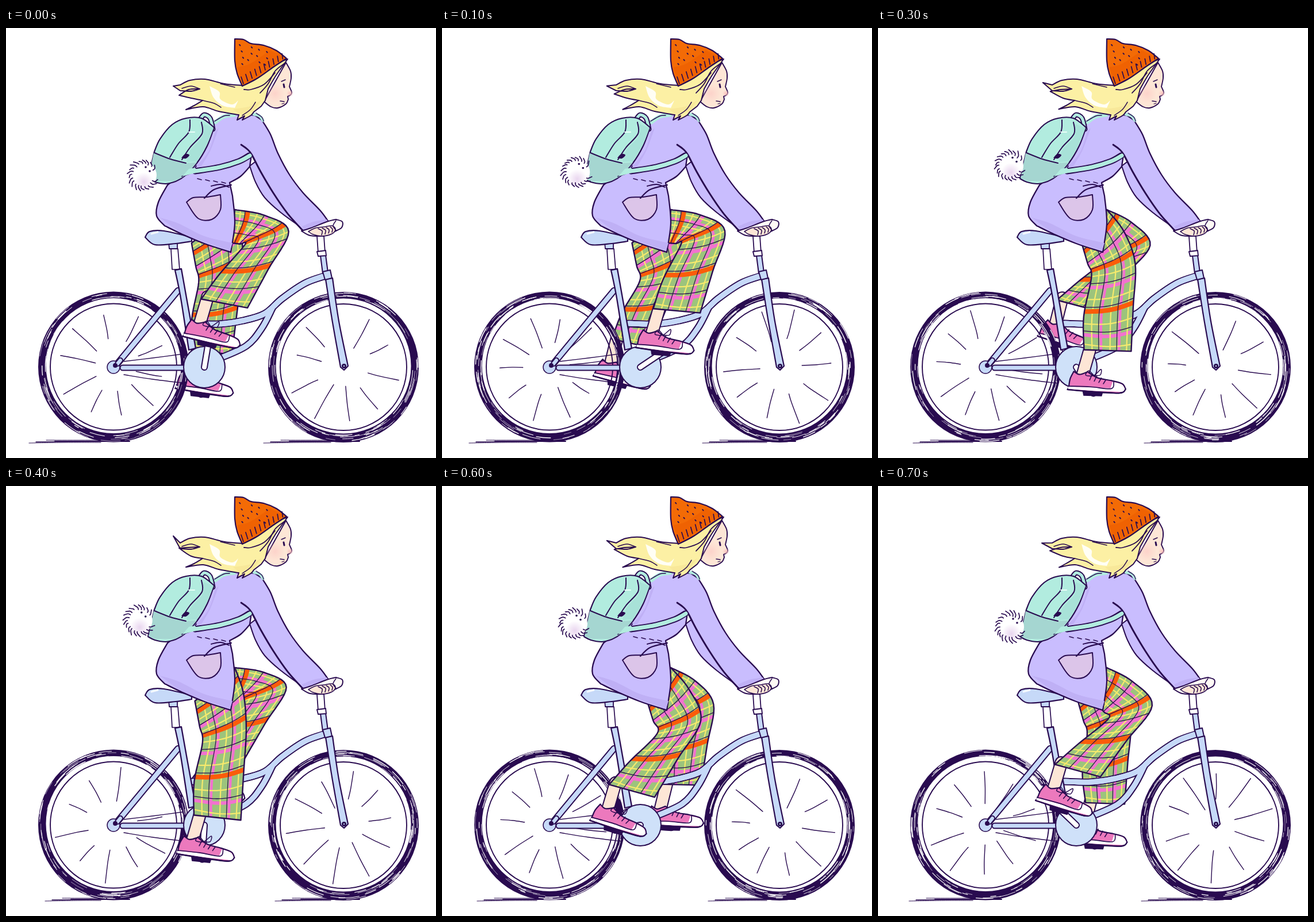
Write an HTML page with a canvas that moves like this. It is 748 px wide and 748 px high and loops after 0.8 s.

```html
<!DOCTYPE html>
<html lang="en">
<head>
<meta charset="utf-8">
<title>Cyclist</title>
<style>
html, body { margin: 0; width: 100%; height: 100%; overflow: hidden; background: #fff; }
canvas { display: block; }
</style>
</head>
<body>
<canvas id="stage" width="748" height="748"></canvas>
<script>
const ctx = document.getElementById('stage').getContext('2d');
const INK = '#290b50', BLUE = '#c6d9f8', LILAC = '#c9bdfe', SHADE = '#bfb0f5', MINT = '#b2ecdf', TEAL = '#a5d6d1';
const GREEN = '#9cc47c', PINK = '#f272cf', ORANGE = '#fb5c0a', YELLOW = '#f6ea6c';
const SKIN = '#fde6d6', HAIR = '#fcf0a4', SHOE = '#ec79bd';
const TAU = Math.PI * 2, RAD = TAU / 360, { sin, cos } = Math;
const HIP = [350, 330], CRANK = [345, 590];

// Heel orbit and bone lengths; the far pedal trails by half a turn.
const NEAR = { lead: -83, cx: 302, cy: 587, rx: 45, ry: 52, thigh: 110, shin: 190, hem: 82 };
const FAR = { lead: 102, cx: 305, cy: 577, rx: 50, ry: 50, thigh: 105, shin: 180, hem: 68 };

function random(seed) {
  return () => {
    seed = (seed * 16807) % 2147483647;
    return seed / 2147483647;
  };
}

const shift = ([x, y], dx, dy) => [x + dx, y + dy];
const mix = (a, b, t) => [a[0] + (b[0] - a[0]) * t, a[1] + (b[1] - a[1]) * t];
const polar = (x, y, r, a) => [x + r * cos(a), y + r * sin(a)];

// Smooth path through points; "|" makes a corner.
function trace(text) {
  const path = new Path2D();
  text.split('|').forEach((part, n) => {
    const p = part.trim().split(/\s+/).map(s => s.split(',').map(Number));
    p.forEach((q, i) => {
      if (!i) return n ? path.lineTo(...q) : path.moveTo(...q);
      const o = p[i - 1], a = p[i - 2] || o, b = p[i + 1] || q;
      path.bezierCurveTo(o[0] + (q[0] - a[0]) / 6, o[1] + (q[1] - a[1]) / 6,
        q[0] - (b[0] - o[0]) / 6, q[1] - (b[1] - o[1]) / 6, ...q);
    });
  });
  return path;
}

function line(text, width = 2.2, color = INK) {
  ctx.lineWidth = width;
  ctx.strokeStyle = color;
  ctx.stroke(trace(text));
}

function fill(text, color) {
  ctx.fillStyle = color;
  ctx.fill(trace(text));
}

function shape(text, color, width) {
  fill(text, color);
  line(text, width);
}

function tube(text, width, color = BLUE) {
  line(text, width + 2);
  line(text, width - 2, color);
}

function disc(x, y, r, color, width) {
  ctx.beginPath();
  ctx.arc(x, y, r, 0, TAU);
  if (color) { ctx.fillStyle = color; ctx.fill(); }
  if (width) { ctx.lineWidth = width; ctx.strokeStyle = INK; ctx.stroke(); }
}

function glow(x, y, r, color) {
  const g = ctx.createRadialGradient(x, y, 0, x, y, r);
  g.addColorStop(0, color);
  g.addColorStop(1, color.slice(0, 7) + '00');
  disc(x, y, r, g);
}

function wheel(cx, cy, spin, seed) {
  const rnd = random(seed);
  for (let i = 0; i < 10; i++) {
    const a = (i * 36 - 90 + spin + rnd() * 6 - 3) * RAD;
    const r1 = 32 + rnd() * 20, r2 = 82 + rnd() * 22;
    line(`${polar(cx, cy, r1, a)} ${polar(cx, cy, 65, a + 0.012)} ${polar(cx, cy, r2, a)}`, 1.4);
  }
  disc(cx, cy, 110, null, 1.9);
  ctx.fillStyle = INK;
  ctx.beginPath();
  ctx.arc(cx, cy, 131, 0, TAU);
  ctx.arc(cx, cy - 2, 117.5, 0, TAU, true);
  ctx.fill();
  ctx.strokeStyle = '#fff';
  for (let i = 0; i < 95; i++) {
    const a = rnd() * TAU;
    ctx.lineWidth = 0.5 + rnd() * 0.9;
    ctx.beginPath();
    ctx.arc(cx, cy, 118 + rnd() * 12, a, a + 0.06 + rnd() * 0.22);
    ctx.stroke();
  }
}

function ground(x, end) {
  line(`${x},722 ${x + 60},721 ${end - 40},721`, 1);
  line(`${x + 12},720 ${end},719`, 1.4);
  line(`${x + 30},717 ${end},717`, 1);
  line(`${x + 45},719 ${end + 10},719`, 2);
}

// Pedal angle to heel, ankle and knee, then the trouser edges around them.
function pose(leg, turn) {
  const a = (leg.lead + turn) * RAD;
  const heel = [leg.cx + leg.rx * cos(a), leg.cy + leg.ry * sin(a)];
  const tilt = (8.5 - 7.5 * cos(a - 25 * RAD)) * RAD;
  const ankle = shift(heel, 25 * cos(tilt) + 24 * sin(tilt), 25 * sin(tilt) - 24 * cos(tilt));

  const dx = ankle[0] - HIP[0], dy = ankle[1] - HIP[1], d = Math.hypot(dx, dy);
  const reach = Math.min(leg.thigh, (leg.thigh ** 2 - leg.shin ** 2 + d * d) / (2 * d));
  const out = Math.sqrt(leg.thigh ** 2 - reach ** 2);
  const knee = shift(HIP, (dx * reach + dy * out) / d, (dy * reach - dx * out) / d);

  const hemBack = shift(ankle, 3, -45), hemFront = polar(...hemBack, leg.hem, tilt);
  const hipFront = [398, 316], hipBack = [333 + 0.87 * (knee[0] - 385), 374];
  const cap = shift(knee, 38, -13), fold = shift(knee, -38, 10);
  return {
    heel, tilt, ankle,
    front: [hipFront, shift(mix(hipFront, cap, 0.5), 5, -9), cap, mix(cap, hemFront, 0.5), hemFront],
    back: [hipBack, mix(hipBack, fold, 0.6), fold, shift(mix(fold, hemBack, 0.5), -7, 5), hemBack]
  };
}

function along(edge, v) {
  const i = Math.min(3, Math.floor(v * 4)), t = v * 4 - i;
  const get = (k, c) => edge[Math.max(0, Math.min(4, k))][c];
  return [0, 1].map(c => {
    const [a, b, d, e] = [-1, 0, 1, 2].map(k => get(i + k, c));
    return b + t * (d - a) / 2 + t * t * (a - 2.5 * b + 2 * d - e / 2) + t * t * t * (1.5 * (b - d) + (e - a) / 2);
  });
}

function trousers({ front, back }) {
  const at = (u, v) => mix(along(back, v), along(front, v), u);
  const run = (path, fn) => { for (let i = 0; i <= 32; i++) path.lineTo(...fn(i / 32)); };
  const stripe = (fn, width, color) => {
    const path = new Path2D();
    run(path, fn);
    ctx.lineWidth = width;
    ctx.strokeStyle = color;
    ctx.stroke(path);
  };
  const down = (us, w, c) => us.forEach(u => stripe(t => at(u, t), w, c));
  const across = (vs, w, c) => vs.forEach(v => stripe(t => at(t, v + 0.02 * sin(t * 3)), w, c));

  const outline = new Path2D();
  run(outline, t => at(0, t));
  run(outline, t => at(1, 1 - t));
  outline.closePath();
  ctx.fillStyle = GREEN;
  ctx.fill(outline);
  ctx.save();
  ctx.clip(outline);
  down([0.36, 0.74], 4.5, PINK);
  across([0.27, 0.58, 0.87], 6, PINK);
  down([0.17, 0.55, 0.9], 2.2, YELLOW);
  across([0.06, 0.19, 0.35, 0.5, 0.65, 0.8, 0.94], 2.2, YELLOW);
  across([0.12, 0.42, 0.72], 8, ORANGE);
  down([0.31, 0.69], 1.2, INK);
  across([0.1, 0.245, 0.395, 0.555, 0.695, 0.845], 1.3, INK);
  ctx.restore();
  ctx.lineWidth = 2.4;
  ctx.strokeStyle = INK;
  ctx.stroke(outline);
}

function foot({ heel, tilt, ankle, front, back }, lace) {
  tube(`${shift(mix(back[4], front[4], 0.14), 0, -6)} ${ankle}`, 21, SKIN);
  ctx.save();
  ctx.translate(...heel);
  ctx.rotate(tilt);
  fill('26,3|62,3|60,11|28,11', INK);
  shape('2,-3 4,-18 10,-31|10,-31 20,-26 34,-31|34,-31 52,-21 76,-17 95,-12 101,-3|101,-3 92,4 70,4 0,1|2,-3', SHOE, 2.2);
  fill('78,-15 94,-11 100,-3|92,2|74,-2|78,-15', '#fff');
  fill('1,-4 50,-4 100,-3|98,2|50,2|1,0', '#fff');
  line('1,-5 40,-5 76,-3 80,-15', 1.7);
  line('0,1 50,4 92,4 101,-3', 2.3);
  for (let i = 0; i < 4; i++) line(`${42 + i * 8},${-27 + i * 3} ${38 + i * 8},${-17 + i * 2}`, 1.6);
  if (lace) line('45,-25 36,-33 31,-25 45,-25 57,-36 56,-26 45,-25', 1.5);
  ctx.restore();
}

function crank({ heel, tilt }) {
  tube(`${CRANK} ${shift(polar(...heel, 45, tilt), 0, 6)}`, 10, '#fff');
}

function bike() {
  line('205,580 255,574 308,567', 1.3);
  line('205,603 255,611 312,618', 1.3);
  tube('203,591 312,591', 9);
  tube('324,514 370,515 412,509 450,497 480,471 520,444 556,431', 11);
  tube('463,488 445,522 418,553 368,576', 11);
  line('326,514 370,515 412,509 450,497 480,471 520,444 554,431', 9, BLUE);
  tube('299,457 245,522 192,586', 10);
  shape('287,384|299,384|302,420|289,420|287,384', '#fff', 1.7);
  shape('283,373|298,373|298,384|284,384|283,373', BLUE, 1.8);
  shape('294,421|305,419 315,475 330,557|318,560 304,470 294,421', BLUE, 2.3);
  shape('242,364 250,354 275,353 323,364|323,371 295,375 259,377 242,364', BLUE, 2.2);
  line('253,358 264,355', 3, '#f4f9ff');
  disc(187, 590, 11, BLUE, 1.5);
  tube('194,584 199,578', 8);
  disc(190, 587, 4, INK);

  shape('541,362|553,362|555,391|543,391|541,362', '#fff', 1.8);
  shape('547,396|556,395|560,425|551,427|547,396', BLUE, 2);
  shape('541,389|556,387|557,396|543,397|541,389', '#fff', 1.9);
  shape('556,437|568,435 579,510 595,588|588,595 582,590|582,590 568,512 556,437', BLUE, 2.2);
  shape('551,424|564,421|567,435|555,438|551,424', BLUE, 2);
  disc(588, 588, 4, INK);
  disc(588, 588, 1.2, BLUE);
}

function coat() {
  shape('424,240 434,268 450,295 478,321 518,350|540,330 490,270 450,220|424,240', LILAC, 2);
  shape('366,160 397,149 433,152|445,160 460,185 473,218 493,255 517,287 547,318 563,340|563,340 545,349 516,352|516,352 490,323 465,287 443,250 427,220|424,241 408,258 389,269|394,292 398,340 391,390|391,390 345,375 307,359 276,344|276,344 262,327 265,303 281,273|330,235|366,160', LILAC, 2.3);
  fill('268,330 300,340 345,362 394,374|390,387 345,372 305,356 268,330', SHADE);
  fill('364,180 352,215 330,242|340,240 356,212 370,174|364,180', SHADE);
  fill('515,345 535,337 558,333|562,340 540,348 518,350|515,345', SHADE);
  line('409,203 420,211 428,221 443,250 465,287 490,323 516,352', 2.8);
  shape('314,303 326,295 350,294 373,290|373,290 373,316 358,333 334,331 314,303', '#dcc5e9', 2);
  line('345,296 362,281 392,273', 2.2);
  line('357,275 373,272 388,277', 1.8);
  for (let i = 0; i < 4; i++) line(`${333 + i * 14},${262 + i * 2} ${340 + i * 14},${264 + i * 2}`, 1.7);
}

function backpack() {
  line('329,249 372,242 405,232 423,222', 11, INK);
  line('328,249 372,242 405,232 424,222', 7, MINT);
  line('364,164 379,154 397,151', 7, MINT);
  line('363,162 379,153 389,152', 1.5);
  tube('339,157 345,151 355,157 360,176', 7, MINT);
  shape('258,215 268,193 289,168 313,157 340,157 362,173|362,173 350,205 332,235 310,258 295,267|295,267 278,271 259,268 247,262|258,215', MINT, 2.2);
  fill('257,217 284,228 313,235|332,234 312,256 293,266|260,266|248,261|257,217', TEAL);
  fill('341,166 342,188 321,212 314,233|332,232 350,202 361,174|341,166', '#a8e2d8');
  line('320,160 318,181 300,201 285,225', 2);
  line('340,164 341,184 320,208 306,229', 2);
  line('258,217 286,228 313,235', 2);
  line('318,181 328,181', 2, '#eafff9');
  fill('305,226 312,219 319,221 313,227 305,226', INK);
  line('331,240 322,252 306,258', 1.7);
  fill('318,245 329,243|333,251|307,258|318,245', MINT);
}

function tassel(x, y, seed) {
  const rnd = random(seed);
  disc(x, y, 23, '#fff');
  glow(x + 1, y + 12, 17, '#e9d6ef');
  for (let i = 0; i < 19; i++) {
    const a = (30 + i * 16.5 + rnd() * 6) * RAD, r = 18 + rnd() * 3, q = 25 + rnd() * 4;
    line(`${polar(x, y, r, a)} ${polar(x, y, 23, a - 0.05)} ${polar(x, y, q, a - 0.25)}`, 1.7);
  }
  disc(x + 4, y - 14, 1.8, INK);
  disc(x + 11, y - 7, 1.8, INK);
}

function head(sway) {
  const swing = sin(sway * Math.PI);
  const t1 = [291 - 6 * swing, 101 - 14 * sway ** 3];
  const t2 = [301 - 2 * swing, 117 - 9 * sway];
  const t3 = [313 + 2 * swing, 142 - sway];

  line('431,150 441,153 447,161', 5, MINT);
  line('435,148 445,155 448,162', 1.4);
  shape('487,60 495,75 496,87 493,102|493,102 497,112 494,117 490,119|491,124 487,132 473,139 461,137 449,128|487,60', SKIN, 1.9);
  glow(468, 114, 17, '#fcc3c088');
  glow(494, 114, 6, '#fcc3c0');
  line('483,98 484,103', 3);
  line('479,93 486,90', 1.4);
  line('477,127 484,128', 1.6);
  line('480,132 484,131', 1.2);

  shape(`412,100 380,97 346,89 320,91 303,99|${t1}|303,109 322,110 337,106|337,106 318,107 ${t2}|${t2} 322,122 342,126|342,126 327,135 ${t3}|${t3} 343,137 370,145 405,151|402,160 415,153|411,160 426,152 431,146|444,136 451,126|456,106 470,82 490,54|460,65 436,88 412,100`, HAIR, 2);
  fill('354,101 371,111 373,124 393,133 404,126|398,139 377,135 361,121 354,101', '#fffef4');
  fill('395,141 425,136 445,125|430,145 406,150|395,141', '#f8e89a');
  line('484,62 468,75 456,97 442,113', 1.8);
  line('468,78 449,98 426,107 414,107', 1.8);
  line('337,106 322,101 306,105', 1.5);
  line('342,126 362,131 374,138', 1.5);
  line('373,97 398,103', 1.3);
  line('434,129 425,142 411,152', 1.5);

  shape('398,19 413,20 426,27 448,30 470,39 488,53|488,53 465,68 438,87 411,101|411,101 402,79 398,57 398,19', '#f36b06', 2.2);
  fill('402,68 425,62 459,39|484,51 440,82 412,98|402,68', '#ef6202');
  for (let i = 0; i < 10; i++) {
    const x = 413 + i * 7.6, y = 97 - i * 4.8;
    line(`${x},${y} ${x - 4 + i * 0.3},${y - 12 + i * 0.3}`, 1.7);
  }
  const rnd = random(91);
  for (let i = 0; i < 13; i++) {
    const col = i % 4, x = 406 + col * 14 + rnd() * 7, y = 29 + col * 4 + Math.floor(i / 4) * 11;
    line(`${x},${y} ${x + 1.5},${y + 1.5}`, 1.8);
  }
}

function hand() {
  shape('514,353 530,348 558,337 574,333|574,333 585,337 584,347 574,353|574,353 552,361 529,361 514,353', '#fffaf5', 2);
  shape('526,354 538,348 553,346 567,344 573,350 567,358 550,362 534,359 526,354', SKIN, 1.5);
  for (let i = 0; i < 4; i++) line(`${543 + i * 7},${349 - i} ${550 + i * 6},${353 - i} ${549 + i * 6},${360 - i * 1.6}`, 1.6);
  line('574,335 569,344 574,352', 1.5);
}

function draw(step) {
  // Hair, tassel, spokes and ground swing out and back over the loop.
  const beat = 4.5 - Math.abs(4.5 - step), sway = beat / 4, seed = 4217 * (beat + 7);
  const near = pose(NEAR, step * 45), far = pose(FAR, step * 45), spin = 28 - 14 * beat;
  ctx.fillStyle = '#fff';
  ctx.fillRect(0, 0, 748, 748);
  ctx.lineCap = ctx.lineJoin = 'round';

  ground(40 + 7 * beat, 205);
  ground(448 + 5 * beat, 605);
  crank(far);
  foot(far);
  trousers(far);
  wheel(187, 589.5, spin, seed);
  wheel(587, 590, spin + 2, seed + 999);
  bike();
  disc(...CRANK, 36, '#cfe1f9', 2);
  crank(near);
  foot(near, true);
  trousers(near);
  coat();
  hand();
  backpack();
  tassel(239 - 9 * sin(sway * 2.2), 256 - 22 * sway, seed + 55);
  head(sway);
}

let shown = -1;
function tick() {
  const step = Math.floor(performance.now() % 800 / 100);
  if (step !== shown) draw(shown = step);
  requestAnimationFrame(tick);
}
tick();
</script>
</body>
</html>
```
